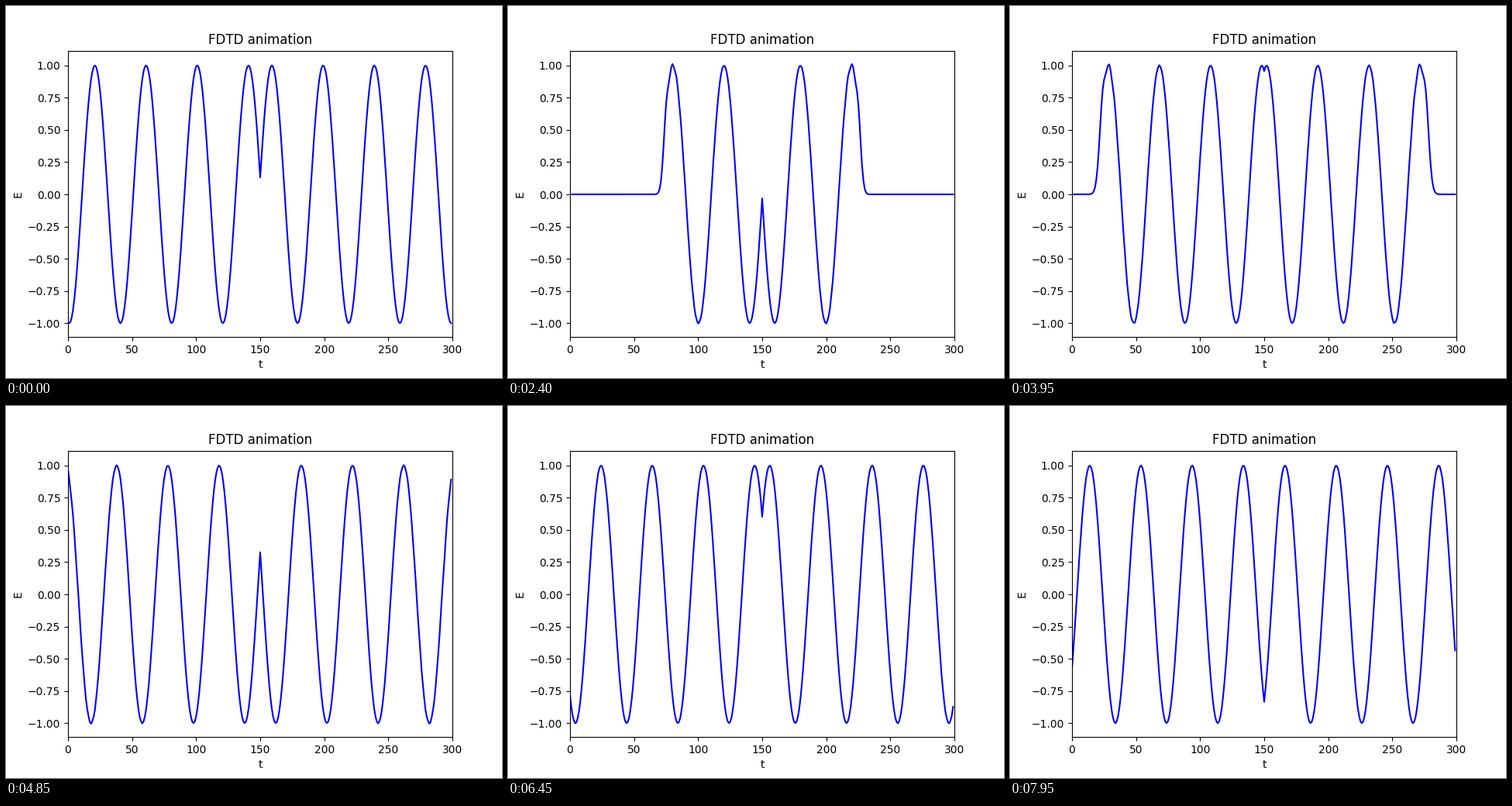
Animation, 640 px wide and 480 px high, one loop 8000 ms. Source, as a matplotlib script:

```python
import numpy as np
import matplotlib.pyplot as plt
from matplotlib.animation import FuncAnimation

CELLS = 300
SOURCE = 150
STEPS = 500
SHOW_EVERY = 2
FRAMES = 160

C = 2.99792458e8
DX = 0.01
DT = 28e-12
FREQ = 0.75e9
S = C * DT / DX               # Courant number
MUR = (S - 1) / (S + 1)


def simulate():
    """One-dimensional FDTD run with a sine source in the middle."""
    e = np.zeros(CELLS)
    h = np.zeros(CELLS - 1)
    shots = []
    for step in range(STEPS):
        old = e.copy()
        e[1:-1] += S * (h[1:] - h[:-1])
        # absorbing ends
        e[0] = old[1] + MUR * (e[1] - old[0])
        e[-1] = old[-2] + MUR * (e[-2] - old[-1])
        e[SOURCE] = np.sin(2 * np.pi * FREQ * (step + 1) * DT)
        h += S * (e[1:] - e[:-1])
        if step % SHOW_EVERY == 0:
            shots.append(e.copy())
    return np.array(shots)


waves = simulate()

fig, ax = plt.subplots(figsize=(6.4, 4.8), dpi=100)
line, = ax.plot(np.arange(CELLS), waves[-1], "b")
low, high = waves.min(), waves.max()
margin = 0.05 * (high - low)
ax.set_xlim(0, CELLS)
ax.set_ylim(low - margin, high + margin)
ax.set_title("FDTD animation")
ax.set_xlabel("t")
ax.set_ylabel("E")


def update(frame):
    # the loop opens on the end of the run, then the run starts afresh
    line.set_ydata(waves[(frame - 1) % len(waves)])
    return line,


anim = FuncAnimation(fig, update, frames=FRAMES, interval=50,
                     repeat=True, repeat_delay=0, blit=False)
plt.show()
```
